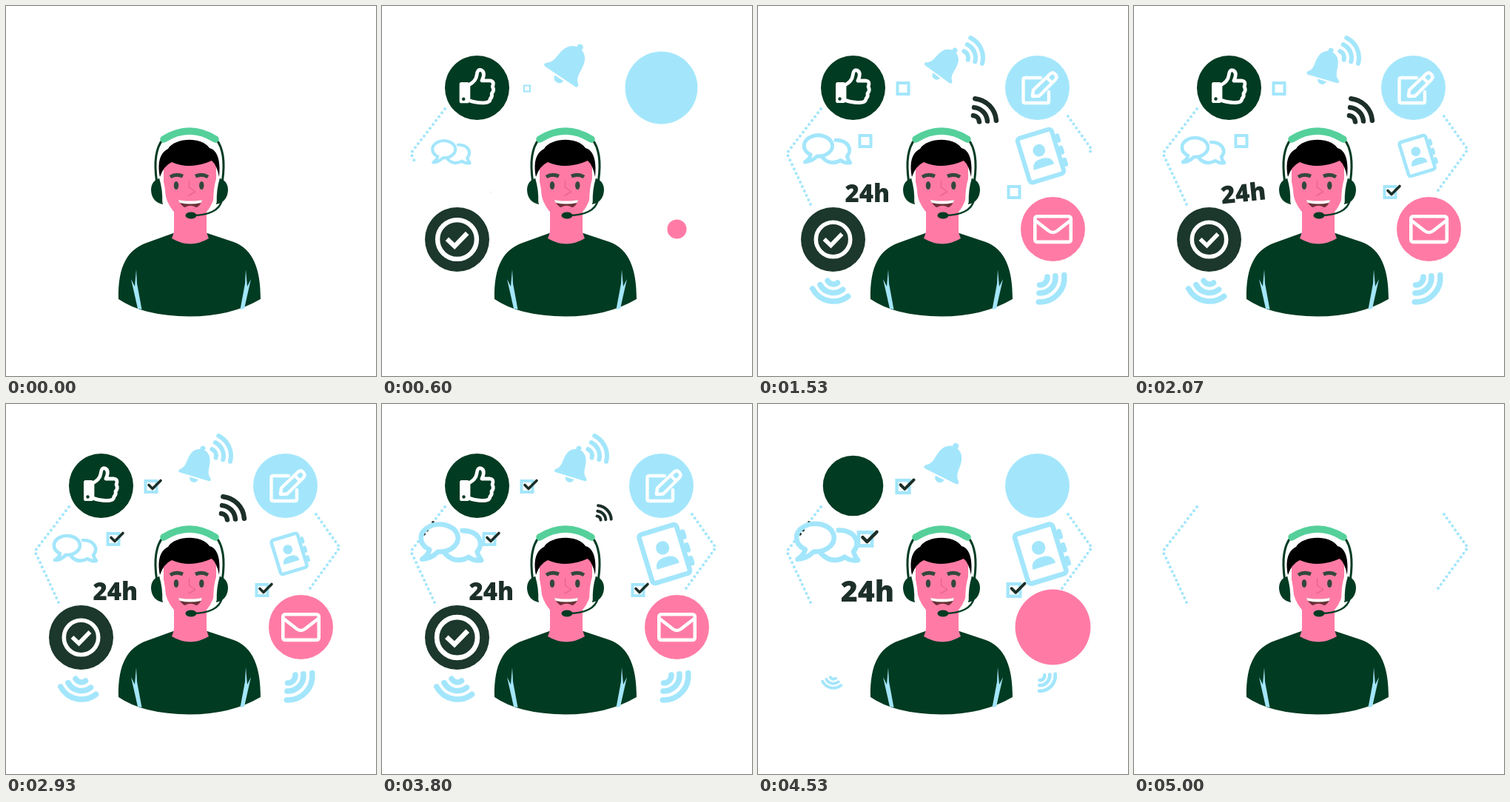
Recreate the animation shown at these times as an HTML page. Size 500 by 500 pixels, loop 5030 ms.

```html
<!DOCTYPE html>
<html lang="en">
<head>
<meta charset="utf-8">
<title>Support agent</title>
<style>
  html, body { margin: 0; width: 100%; height: 100%; overflow: hidden; background: #fff; }
  svg { display: block; width: 100vw; height: 100vh; }
  .line { fill: none; stroke-linecap: round; stroke-linejoin: round; }
  .white { stroke: #fff; }
  .sky { stroke: #a3e6fb; }
  text { font: 800 33px "Open Sans", "Noto Sans", sans-serif; fill: #1c2f28; text-anchor: middle; }
</style>
</head>
<body>
<svg viewBox="0 0 500 500">
  <g id="dots"></g>

  <g id="thumbDisc"><circle cx="128.5" cy="110.5" r="43.5" fill="#003b22"/></g>
  <g id="checkDisc"><circle cx="101.5" cy="315.5" r="43.5" fill="#1c372c"/></g>
  <g id="penDisc"><circle cx="377.5" cy="110.5" r="43.5" fill="#a3e6fb"/></g>
  <g id="mailDisc"><circle cx="398.5" cy="301.5" r="43.5" fill="#ff7ba5"/></g>

  <g id="thumb">
    <path class="line white" stroke-width="4.8" d="M117 107Q127 102 128 94Q129 85 134 87Q140 90 135 101H146Q152 102 149 109Q152 114 148 118Q149 123 146 125Q146 130 138 130.5Q127 131 117 127Z"/>
    <rect x="105" y="103" width="13" height="28" rx="2.5" fill="#fff"/>
    <circle cx="110.5" cy="125.5" r="2.2" fill="#003b22"/>
  </g>
  <g id="check" class="line white" stroke-width="5.6">
    <circle cx="101.5" cy="315.5" r="23.2"/>
    <path d="M89.500 315L98.500 323.500L113.500 308" style="stroke-linecap:butt;stroke-linejoin:miter"/>
  </g>
  <g id="pen" class="line white" stroke-width="4.4">
    <path d="M382 97H361Q358.500 97 358.500 99.500V128.500Q358.500 131 361 131H391Q393 131 393 128.500V116"/>
    <path d="M371 122L372 113.500L395 91.500Q399 88.500 402 92.500Q405 95.500 402 99.500L380 121.500ZM390 96.500L397 103.500"/>
  </g>
  <g id="mail" class="line white" stroke-width="4.6">
    <rect x="374.300" y="284.300" width="48.500" height="34.600" rx="3"/>
    <path d="M375 290L393 304Q398.500 308 404 304L422 290"/>
  </g>

  <g id="chat" class="line sky" stroke-width="4.6">
    <path d="M73 202A17.500 13 0 1 1 81 204Q74 211 66 211Q72 207 73 202Z"/>
    <path d="M104 184C120 184 125 196 118 204Q119 208 122 212Q115 213 110 209Q98 216 88 206"/>
  </g>
  <g id="book"><g transform="translate(384 202) rotate(-17)">
    <g class="line sky" stroke-width="4.6">
      <rect x="-20" y="-24" width="37" height="48" rx="3"/>
      <path d="M21-15v5M21-2v5M21 11v5"/>
    </g>
    <circle cx="-1.500" cy="-6" r="6.400" fill="#a3e6fb"/>
    <path fill="#a3e6fb" d="M-12.500 12Q-12.500 3-1.500 3Q9.500 3 9.500 12Z"/>
  </g></g>

  <g id="bell"><g id="swing"><g transform="translate(266 60) rotate(15)" fill="#a3e6fb">
    <circle r="3.500"/>
    <path d="M0 1C-14 3-15 14-16 26Q-17 33-22 36Q-24 40-20 40H20Q24 40 22 36Q17 33 16 26C15 14 14 3 0 1Z"/>
    <path d="M-6 42H6Q5 47.500 0 47.500Q-5 47.500-6 42Z"/>
  </g></g></g>

  <g id="waves"></g>
  <g id="boxes"></g>
  <g id="hours"><text id="hoursText" x="147.800" y="264.500">24h</text></g>

  <g>
    <path fill="#003b22" d="M152 396C151 350 165 329 190 320L226 307H272L308 319C334 329 344 355 344 396Q304 419.500 248 419.500Q185 419 152 396Z"/>
    <path id="sleeve" fill="#a3e6fb" d="M176 356L177 375L183.500 410L178 409L169 369L174 379Z"/>
    <use href="#sleeve" transform="translate(500) scale(-1 1)"/>
    <path fill="#ff7ba5" d="M227 265V302Q227 307 224 314Q249 329 274 314Q271 307 271 302V265Z"/>
    <path fill="#ff7ba5" d="M213 205H284V240C283 270 268 288 249 288C230 288 215 270 213 240Z"/>
    <path d="M208 231C204 210 209 198 219 193C228 178 264 176 275 192C287 195 290 212 288 231Q285 215 278 209Q249 222 224 211Q213 216 208 231Z"/>
    <g id="ear">
      <path fill="#003b22" d="M210 232Q196 235 196 249Q197 265 212 268Q213 250 210 232Z"/>
      <path class="line white" stroke-width="4.500" d="M209.500 233Q214 248 213.500 265"/>
      <path class="line" stroke="#003b22" stroke-width="3" d="M203.500 236C200 211 203 191 212 180"/>
    </g>
    <use href="#ear" transform="translate(496) scale(-1 1)"/>
    <path class="line" stroke="#55d09a" stroke-width="9.500" d="M213 180Q248 158 283 180"/>
    <path class="line" stroke="#33483c" stroke-width="5" style="stroke-linecap:butt" d="M222 231Q230 226 239 230M256 230Q265 226 273 231"/>
    <g fill="#33483c">
      <ellipse cx="230" cy="242.500" rx="3.200" ry="5.500"/>
      <ellipse cx="264.300" cy="242.500" rx="3.200" ry="5.500"/>
    </g>
    <path class="line" stroke="#ea6693" stroke-width="1.500" d="M247.500 236V246M249 246L256 251L247 256"/>
    <path fill="#6b3038" d="M233 262Q249 266 265 262Q262 274 249 274Q237 273 233 262Z"/>
    <path fill="#ff7ba5" d="M241 272.500Q249 267 258 272.500Q249 276 241 272.500Z"/>
    <path fill="#fff" d="M233 262Q249 265 265 262Q264.500 264.500 263.500 266Q249 269 235 266Q233.500 264 233 262Z"/>
    <path class="line" stroke="#003b22" stroke-width="2.500" d="M292 262C289 276 274 283 252 283"/>
    <ellipse cx="250" cy="283" rx="7.500" ry="4.600" fill="#003b22"/>
  </g>
</svg>
<script>
const LOOP = 5030, POP = 360, BACK = 2.6;
const SKY = '#a3e6fb', DARK = '#1c2f28';
const $ = id => document.getElementById(id);

function add(parent, tag, attrs) {
  const el = document.createElementNS('http://www.w3.org/2000/svg', tag);
  for (const key in attrs) el.setAttribute(key, attrs[key]);
  return parent.appendChild(el);
}

const clamp = x => Math.min(1, Math.max(0, x));
const show = (el, on) => { el.style.display = on ? '' : 'none'; };

function backOut(x) {
  const u = clamp(x) - 1;
  return 1 + (BACK + 1) * u ** 3 + BACK * u * u;
}

// Springs in at start, and out again by the mirrored curve at end.
const pop = (t, start, end) => backOut((t < end ? t - start : end + POP - t) / POP);

function zoom(el, cx, cy, s) {
  show(el, s > 0.005);
  el.setAttribute('transform', `translate(${cx} ${cy}) scale(${s}) translate(${-cx} ${-cy})`);
}

const PEAKS = [1710, 2590, 3740, 4480];
function pulse(t) {
  const d = Math.min(...PEAKS.map(p => Math.abs(t - p))) / 250;
  return 1 + 0.5 * (d < 1 ? Math.cos(d * Math.PI / 2) ** 2 : 0);
}

// id, centre, start of entry, start of exit
const POPS = [
  ['thumbDisc', 128.5, 110.5, 50, 4260],
  ['checkDisc', 101.5, 315.5, 130, 3900],
  ['penDisc', 377.5, 110.5, 470, 4640],
  ['mailDisc', 398.5, 301.5, 580, 4400],
  ['thumb', 128.5, 109, 270, 3835],
  ['check', 101.5, 315.5, 350, 3660],
  ['pen', 380, 110.5, 880, 4000],
  ['mail', 398.5, 301.5, 880, 4000],
  ['bell', 258, 82, 420, 4420],
  ['hours', 147, 252, 600, 4380]
].map(([id, ...rest]) => [$(id), ...rest]);

// Dotted brackets
function dotRow(points, count) {
  const legs = points.slice(1).map((p, i) => Math.hypot(p[0] - points[i][0], p[1] - points[i][1]));
  const total = legs[0] + legs[1];
  return Array.from({ length: count }, (_, i) => {
    const d = total * i / (count - 1);
    const k = d <= legs[0] ? 0 : 1;
    const f = (d - (k ? legs[0] : 0)) / legs[k];
    const x = points[k][0] + (points[k + 1][0] - points[k][0]) * f;
    const y = points[k][1] + (points[k + 1][1] - points[k][1]) * f;
    return { el: add($('dots'), 'circle', { cx: x, cy: y, r: 2, fill: SKY }), k, y };
  });
}
const leftDots = dotRow([[85, 139], [39, 199], [71, 268]], 24);
const rightDots = dotRow([[419, 149], [451, 194], [411, 249]], 20);
const drawDots = (row, p) => row.forEach((dot, i) => show(dot.el, p > 0 && i <= p * (row.length - 1)));

// Signal waves: three arcs around one centre
function arc(cx, cy, r, a, b) {
  const at = deg => {
    const rad = deg * Math.PI / 180;
    return `${cx + r * Math.cos(rad)} ${cy + r * Math.sin(rad)}`;
  };
  return `M${at(a)}A${r} ${r} 0 0 1 ${at(b)}`;
}
const WAVES = [
  { cx: 274, cy: 70, a: -64, b: 15, radii: [10, 20, 30], color: SKY, width: 6, start: 720, step: 100, keys: [4080, 4170, 4330], mid: 0.74 },
  { cx: 290, cy: 157, a: -84, b: -4, radii: [9, 20, 32], color: DARK, width: 6.5, start: 1020, step: 130, keys: [3600, 3800, 4180], mid: 0.62 },
  { cx: 102, cy: 367, a: 52, b: 152, radii: [9, 20.5, 32], color: SKY, width: 7.5, start: 880, step: 120, keys: [4380, 4500, 4750], mid: 0.6 },
  { cx: 381, cy: 367, a: -6, b: 93, radii: [10, 21, 33], color: SKY, width: 7.5, start: 1180, step: 120, keys: [4420, 4540, 4790], mid: 0.6 }
];
for (const w of WAVES) {
  w.el = add($('waves'), 'g', { class: 'line', stroke: w.color, 'stroke-width': w.width });
  w.arcs = w.radii.map(r => add(w.el, 'path', { d: arc(w.cx, w.cy, r, w.a, w.b) }));
}
function drawWave(w, t) {
  const [from, mid, end] = w.keys;
  const s = t < mid
    ? 1 - (1 - w.mid) * clamp((t - from) / (mid - from))
    : w.mid * (1 - clamp((t - mid) / (end - mid)));
  zoom(w.el, w.cx, w.cy, s);
  w.arcs.forEach((a, i) => show(a, t >= w.start + i * w.step));
}

// Tick boxes: centre, entry, tick time, exit
const BOXES = [
  [196, 111.5, 560, 2250, 4300],
  [145, 182.5, 620, 2480, 4360],
  [346, 251.5, 680, 1750, 4440]
].map(([cx, cy, start, tick, end]) => {
  const el = add($('boxes'), 'g', {});
  add(el, 'rect', { x: cx - 7.5, y: cy - 7.5, width: 15, height: 15, fill: 'none', stroke: SKY, 'stroke-width': 4 });
  const mark = add(el, 'path', {
    d: `M${cx - 3} ${cy - 2}l5 5l11-11`, class: 'line', stroke: DARK,
    'stroke-width': 3.6, pathLength: 1
  });
  return { el, mark, cx, cy, start, tick, end };
});

function draw(t) {
  for (const [el, cx, cy, start, end] of POPS) zoom(el, cx, cy, pop(t, start, end));

  const beat = pulse(t);
  zoom($('chat'), 93.5, 214, pop(t, 520, 4620) * beat);
  zoom($('book'), 384.5, 202, pop(t, 1320, 4600) * beat);

  const ring = 12.5 - 11 * Math.cos((t - 2070) / 890 * 2 * Math.PI);
  $('swing').setAttribute('transform', `rotate(${ring} 266 60)`);

  const sway = t > 1820 && t < 2820 ? -6 * Math.sin((t - 1820) / 500 * Math.PI) : 0;
  $('hoursText').setAttribute('transform', `rotate(${sway} 147 252)`);

  drawDots(leftDots, clamp((t - 120) / 850));
  drawDots(rightDots, clamp((t - 1110) / 800));
  for (const dot of leftDots) {
    const covered = beat > 1.3 && dot.k === 0 && dot.y > 159 && dot.y < 185;
    dot.el.setAttribute('fill', covered ? DARK : SKY);
  }

  WAVES.forEach(w => drawWave(w, t));

  for (const b of BOXES) {
    zoom(b.el, b.cx, b.cy, pop(t, b.start, b.end));
    const p = clamp((t - b.tick) / 240);
    show(b.mark, p > 0);
    b.mark.setAttribute('stroke-dasharray', `${p} 2`);
  }
}

const began = performance.now();
function tick() {
  draw((performance.now() - began) % LOOP);
  requestAnimationFrame(tick);
}
tick();
</script>
</body>
</html>
```
